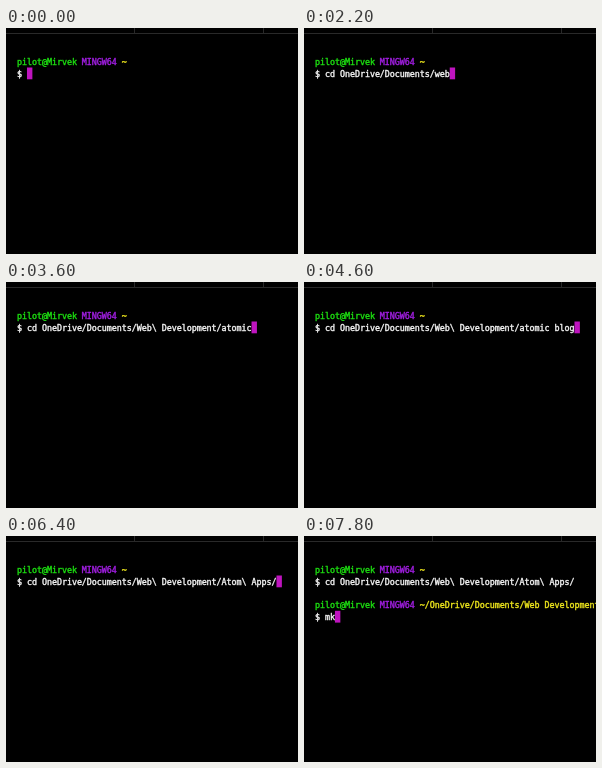
Animation, 292 px wide and 226 px high, one loop 8 s. Source, as an HTML page with a canvas:

```html
<!DOCTYPE html>
<html lang="en">
<head>
<meta charset="utf-8">
<title>Terminal session</title>
<style>
  html, body { margin: 0; width: 100%; height: 100%; overflow: hidden; background: #000; }
  canvas { display: block; width: 292px; height: 226px; }
</style>
</head>
<body>
<canvas id="stage" width="292" height="226"></canvas>
<script>
const ctx = document.getElementById('stage').getContext('2d');
const LOOP = 8000;
const LEFT = 11, CELL = 4.99;
const ROWS = [37, 48.7, 72.3, 84];
const COLOR = {
  user: '#1cdc10', host: '#a01ee0', path: '#eee61c',
  text: '#f4f4f4', cursor: '#bf14bf', frame: '#292929'
};
const ENTER = 6600;
const DOCS = 'cd OneDrive/Documents/';
const DEV = DOCS + 'Web\\ Development/';

// [start in ms, command text]
const first = [
  [0, ''], [200, 'c'], [400, 'cd'], [600, 'cd '], [800, 'cd o'],
  [1000, 'cd OneDrive/'], [1200, 'cd OneDrive/d'], [1400, 'cd OneDrive/do'],
  [1600, DOCS], [1800, DOCS + 'w'], [2000, DOCS + 'we'], [2200, DOCS + 'web'],
  [2400, DEV]
];
[...'atomic blog'].forEach((_, i, all) =>
  first.push([2600 + i * 200, DEV + all.slice(0, i + 1).join('')]));
first.push(
  [5400, DEV + 'atomic blo'], [5600, DEV + 'atomic bl'], [5800, DEV + 'atomic b'],
  [6000, DEV + 'atomic'], [6200, DEV + 'ato'], [6400, DEV + 'Atom\\ Apps/']
);
const second = [[ENTER, ''], [7600, 'm'], [7800, 'mk']];

function textAt(steps, t) {
  let text = '';
  for (const [start, value] of steps) if (t >= start) text = value;
  return text;
}

// Every character sits in its own terminal cell; a thin outline adds weight.
function write(text, col, row, color) {
  ctx.fillStyle = ctx.strokeStyle = color;
  [...text].forEach((c, i) => {
    const x = LEFT + (col + i) * CELL;
    ctx.fillText(c, x, ROWS[row]);
    ctx.strokeText(c, x, ROWS[row]);
  });
}

function prompt(row, path) {
  write('pilot@Mirvek', 0, row, COLOR.user);
  write('MINGW64', 13, row, COLOR.host);
  write(path, 21, row, COLOR.path);
}

function command(row, text, active) {
  write('$ ' + text, 0, row, COLOR.text);
  if (!active) return;
  ctx.fillStyle = COLOR.cursor;
  ctx.fillRect(LEFT + (text.length + 2) * CELL, ROWS[row] - 9.2, CELL + 0.4, 11.8);
}

function draw(t) {
  ctx.fillStyle = '#000';
  ctx.fillRect(0, 0, 292, 226);
  ctx.fillStyle = COLOR.frame;
  ctx.fillRect(0, 5, 292, 1);
  ctx.fillRect(128, 0, 1, 5);
  ctx.fillRect(257, 0, 1, 5);

  ctx.font = '8.4px "DejaVu Sans Mono", monospace';
  ctx.lineWidth = 0.4;
  ctx.lineJoin = 'round';
  prompt(0, '~');
  command(1, textAt(first, t), t < ENTER);
  if (t >= ENTER) {
    prompt(2, '~/OneDrive/Documents/Web Development/Atom Apps');
    command(3, textAt(second, t), true);
  }
}

function tick() {
  draw(performance.now() % LOOP);
  requestAnimationFrame(tick);
}
tick();
</script>
</body>
</html>
```
